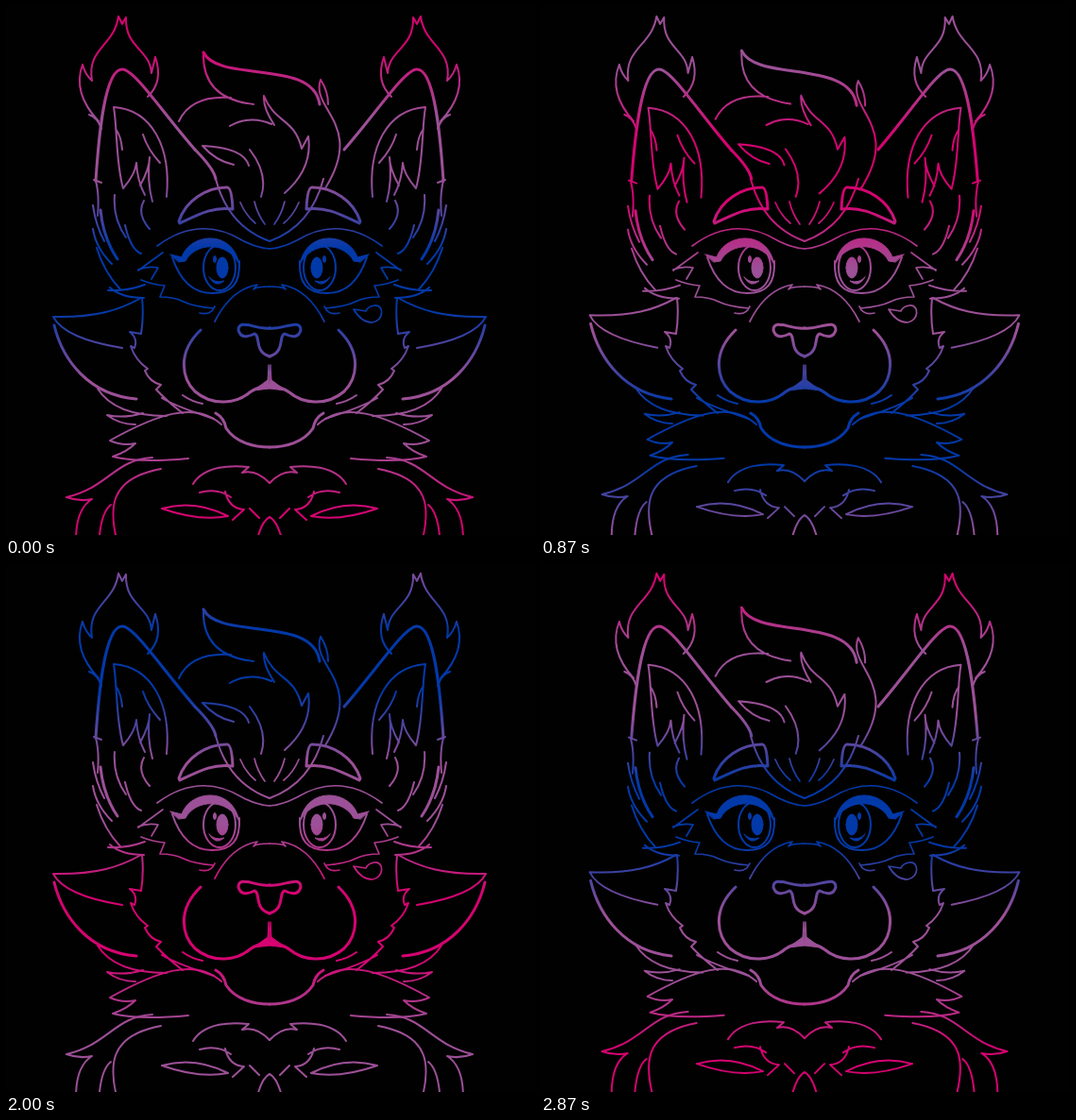
Write an HTML page that moves like this. It is 560 by 560 pixels and loops after 3000 ms.

```html
<!DOCTYPE html>
<html lang="en">
<head>
<meta charset="utf-8">
<title>Neon feline</title>
<style>
@property --sway { syntax: '<number>'; inherits: true; initial-value: 0; }
@property --blink { syntax: '<number>'; inherits: true; initial-value: 0; }

html, body { margin: 0; width: 100%; height: 100%; overflow: hidden; background: #020102; }

/* White lines on black, tinted by a scrolling gradient */
.stage {
  position: relative; width: 560px; height: 560px; overflow: hidden;
  background: #000; isolation: isolate; mix-blend-mode: screen;
  animation: sway 1s step-end -5ms infinite, blink 3s step-end -5ms infinite;
}
svg { display: block; fill: none; stroke: #fff; stroke-width: 2; stroke-linecap: round; stroke-linejoin: round; }
.tint {
  position: absolute; inset: 0; mix-blend-mode: multiply;
  --pink: #d60270; --purple: #9b4f96; --blue: #0038a8;
  background: linear-gradient(var(--pink) 6%, var(--purple) 19% 31%, var(--blue) 44% 56%,
    var(--purple) 69% 81%, var(--pink) 94%) 0 10px / 100% 560px;
  animation: flow 3s steps(24) -5ms infinite;
}
@keyframes flow { to { background-position: 0 570px; } }

/* One cosine swing in eight held poses */
@keyframes sway {
  0% { --sway: 0; }
  12.5%, 87.5% { --sway: .17; }
  25%, 75% { --sway: .585; }
  37.5%, 62.5% { --sway: 1; }
  50% { --sway: 1.17; }
}
@keyframes blink {
  0%, 16.667% { --blink: 0; }
  4.167%, 12.5% { --blink: .5; }
  8.333% { --blink: 1; }
}

.flame { transform-origin: 0 125px; transform: skewX(calc(var(--sway) * -9.9deg)); }
.ear { transform-origin: 0 260px; transform: skewX(calc(var(--sway) * -3.4deg)); }
.inner { transform: translate(calc(var(--sway) * -3px), calc(var(--sway) * 4px)); }
.fur { transform: translateY(calc(var(--sway) * 4px)); }
.cheek { transform-origin: 143px 309px; transform: skewY(calc(var(--sway) * 6deg)) scaleX(calc(1 - .1 * var(--sway))); }
.neck { transform-origin: 228px 443px; transform: skewY(calc(var(--sway) * 3.5deg)) scaleX(calc(1 - .13 * var(--sway))); }
.chest { transform: translate(calc(var(--sway) * 4px), calc(var(--sway) * -18px)); }
.bib { transform: translateY(calc(var(--sway) * -11px)); }
.hair { transform-origin: 280px 193px; transform: rotate(calc(var(--sway) * 8deg)); }

.brow {
  transform-origin: 212px 212px;
  transform: translate(calc(var(--blink) * 7px), calc(var(--blink) * 20px)) rotate(calc(var(--blink) * 15deg));
}
.iris { clip-path: inset(calc(var(--blink) * 62px - 5px) -5px -5px -5px); }
.lid {
  opacity: calc(2 - 2 * var(--blink));
  transform: translateY(calc(var(--blink) * 455px)) scaleY(calc(1 - 1.6 * var(--blink)));
}
.shut { opacity: calc(2 * var(--blink) - 1); }

.thin { stroke-width: 1.7; }
.bold { stroke-width: 3; }
.solid { fill: #fff; stroke-width: 1; }
</style>
</head>
<body>
<div class="stage">
<svg width="560" height="560" viewBox="0 0 560 560">
  <g id="half">
    <path class="flame" d="M98 122Q70 92 81 62Q84 73 91 79C85 45 115 42 119 11L123 19 127 12C126 45 152 45 154 71L158 54Q167 80 150 96M88 115Q97 118 101 130"/>
    <path class="ear bold" d="M95 185C98 140 104 67 123 67C136 67 165 112 200 152"/>
    <path class="inner" d="M124 193C116 165 118 130 114 107C155 110 175 150 170 202M116 130Q122 138 123 152M145 136Q150 152 163 166M124 193Q137 178 138 166Q139 185 147 200M142 190Q152 172 152 160Q149 185 155 207"/>
    <g class="fur">
      <path d="M93 184L101 187M95 185Q99 200 97 222M92 211Q95 232 104 249M92 236Q95 256 112 273M96 256Q104 282 121 300M108 301Q128 302 147 295M110 298Q122 309 146 309M115 200Q113 225 127 245M126 232Q132 258 143 262M146 206Q138 220 152 236"/>
      <path class="bold" d="M100 216Q103 246 118 268"/>
    </g>
    <g class="cheek">
      <path d="M143 309C120 322 95 330 50 329Q62 352 123 362"/>
      <path class="bold" d="M51 338C60 375 88 412 138 416"/>
    </g>
    <path class="neck" d="M97 405Q115 434 170 434M145 431Q125 437 107 433Q120 443 137 443M228 443C200 418 160 432 110 460Q123 466 137 463Q128 472 113 477Q140 484 193 479"/>
    <path class="chest" d="M155 478C115 480 108 510 64 520Q78 525 91 522Q70 535 75 582M164 490C110 500 105 530 122 582M111 528Q98 538 98 582"/>
    <path class="bib" d="M198 506C210 486 240 486 257 488L250 494Q265 490 279 505M165 532Q200 522 235 540Q205 546 165 532M232 514Q236 532 252 533L240 544M258 532L268 542M264 572Q270 545 279 541M205 515Q224 510 238 520"/>

    <!-- face -->
    <path class="thin" d="M140 280L166 261M160 254C195 228 225 233 250 248Q265 256 279 257M140 279Q150 275 161 277L154 289M143 290Q155 295 168 296L163 308Q178 308 188 313T220 320M205 325Q217 328 221 318M279 297Q265 297 262 300L266 295Q238 300 221 334M248 208Q254 222 264 230M263 207Q266 220 274 231"/>
    <path d="M222 183Q235 233 279 249M144 309Q146 328 143 347L131 345Q140 352 136 362L132 360Q137 375 150 384L147 386Q152 398 164 401L159 406Q170 418 187 431M187 412Q197 419 208 421M165 415Q180 424 220 437"/>
    <path class="bold" d="M206 343C180 368 187 395 200 408C220 425 245 420 258 409Q268 402 279 402M222 431Q231 436 233 447C243 462 262 467 279 467M279 341C265 343 246 330 246 343Q249 354 263 347C270 349 262 366 279 371"/>
    <path class="solid" d="M278 380L277 396 262 407 279 405Z"/>
    <path class="brow bold" d="M183 228C190 206 212 192 234 192Q239 192 240 215C220 212 205 220 184 230Z"/>

    <!-- eye -->
    <g class="iris">
      <path d="M176 266C185 293 200 304 218 304C240 304 248 293 247 270"/>
      <ellipse cx="226" cy="277" rx="17" ry="24"/>
      <ellipse class="solid" cx="229" cy="277" rx="6" ry="11"/>
      <ellipse class="solid" cx="221" cy="268" rx="1.5" ry="3.5"/>
      <path class="solid" d="M215 287Q221 294 231 291Q222 299 215 287Z"/>
    </g>
    <path class="lid solid" d="M174 263L186 266C195 240 240 236 247 274C235 248 200 250 190 270L183 271Z"/>
    <g class="shut">
      <path class="solid" d="M175 289Q210 301 248 294C236 310 204 312 188 298Z"/>
      <path class="thin" d="M247 258Q244 265 248 272M262 258Q270 259 279 258"/>
    </g>
  </g>
  <use href="#half" transform="matrix(-1 0 0 1 558 0)"/>

  <path class="ear bold" d="M200 152Q220 172 222 183"/>
  <g class="hair">
    <path class="bold" d="M209 49C225 82 325 55 332 104"/>
    <path d="M209 49Q207 98 262 104M183 122Q196 94 238 97M237 127Q258 115 281 125M284 126Q272 108 273 95C285 125 305 118 313 151L320 138Q325 172 295 198M333 78C322 110 380 125 338 193M333 78Q341 90 341 104M208 148Q252 150 257 169M258 152Q278 178 270 202M208 148Q222 164 241 168"/>
  </g>
  <path class="thin" d="M368 321Q376 335 388 335C400 333 401 316 390 317Q383 318 381 323Z"/>
</svg>
<div class="tint"></div>
</div>
</body>
</html>
```
